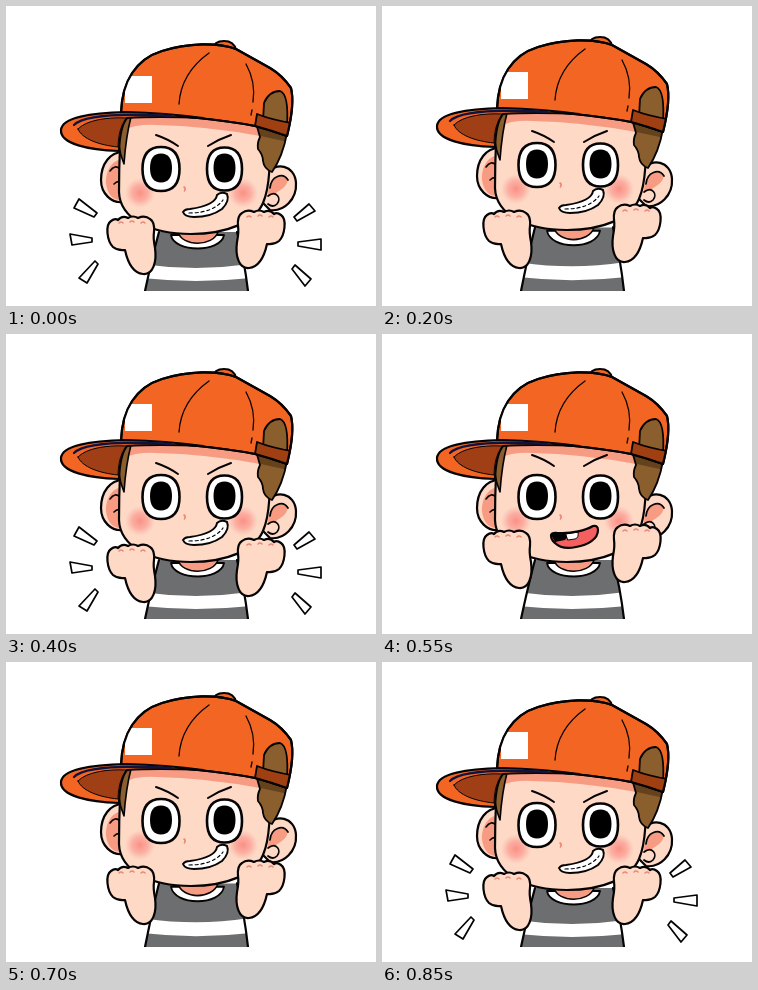
Animation, 370 px wide and 300 px high, one loop 1 s. Source, as an HTML page with a canvas:

```html
<!DOCTYPE html>
<html lang="en">
<head>
<meta charset="utf-8">
<title>Cheering boy</title>
<style>
html, body { margin: 0; width: 100%; height: 100%; overflow: hidden; background: #fff; }
canvas { display: block; width: 370px; height: 300px; }
</style>
</head>
<body>
<canvas id="stage" width="370" height="300"></canvas>
<script>
const ctx = document.getElementById('stage').getContext('2d');
const INK = '#050303', SKIN = '#fdd9c6', BLUSH = '#f79c83', ORANGE = '#f26522', HAIR = '#8b5e2e';
const LOOP = 1000;

// One hop in 50 ms steps: head and hand offsets, mouth, burst marks
const HOP = [
  { head: 0, hand: -14, open: true, burst: false },
  { head: -9, hand: -21, open: true, burst: false },
  { head: -14, hand: -24, open: true, burst: false },
  { head: -4, hand: -6, open: false, burst: false },
  { head: 6, hand: 13, open: false, burst: true },
  { head: 3, hand: 7, open: false, burst: true }
];
const SETTLE = { head: 1, hand: 2, open: false, burst: true };
const REST = { head: 0, hand: 0, open: false, burst: true };

function poseAt(ms) {
  const step = Math.floor(ms / 50);
  if (step >= 1 && step <= 6) return HOP[step - 1];
  if (step === 7) return SETTLE;
  if (step >= 11 && step <= 16) return HOP[step - 11];
  return REST;
}

function shape(d, fill, width = 2.2, stroke = INK) {
  const p = new Path2D(d);
  if (fill) { ctx.fillStyle = fill; ctx.fill(p); }
  if (width) { ctx.strokeStyle = stroke; ctx.lineWidth = width; ctx.stroke(p); }
}

// Ellipse with slightly squared corners
function bead(x, y, rx, ry, fill, width) {
  const a = rx * .66, b = ry * .66;
  shape(`M${x - rx} ${y} C${x - rx} ${y - b} ${x - a} ${y - ry} ${x} ${y - ry}
    S${x + rx} ${y - b} ${x + rx} ${y} S${x + a} ${y + ry} ${x} ${y + ry}
    S${x - rx} ${y + b} ${x - rx} ${y} Z`, fill, width);
}

function eye(x, y, rx, ry) {
  bead(x, y, rx, ry, '#fff', 2.6);
  bead(x, y - 1, 11, 14.5, '#000', 0);
}

function at(dx, dy, draw) {
  ctx.save();
  ctx.translate(dx, dy);
  draw();
  ctx.restore();
}

function clipped(d, draw) {
  ctx.save();
  ctx.clip(new Path2D(d));
  draw();
  ctx.restore();
}

function cheek(x, y) {
  const g = ctx.createRadialGradient(x, y, 1, x, y, 15);
  g.addColorStop(0, 'rgba(250,130,122,.8)');
  g.addColorStop(.5, 'rgba(250,140,132,.55)');
  g.addColorStop(1, 'rgba(250,160,150,0)');
  ctx.fillStyle = g;
  ctx.fillRect(x - 15, y - 15, 30, 30);
}

const SIDES = 'M153 226 Q147 248 139 285 M242 285 Q238 252 231 226';
const TORSO = 'M153 226 Q147 248 139 285 H242 Q238 252 231 226 Z';

function body(lift) {
  ctx.save();
  ctx.beginPath();
  ctx.rect(0, 0, 370, 285);
  ctx.clip();
  ctx.translate(0, 285);
  ctx.scale(1, 1 - lift / 52);
  ctx.translate(0, -285);
  shape(TORSO, '#6d6e70', 0);
  clipped(TORSO, () => shape('M136 258 Q190 266 244 258 V272 Q190 278 136 272 Z', '#fff', 0));
  shape(SIDES, null);
  shape('M165 229 C168 247 215 247 218 229 Z', '#fff', 1.8);
  shape('M172 226 C176 241 207 241 212 226 Z', BLUSH, 1.5);
  ctx.restore();
}

function ears() {
  shape('M117 146 C104 146 95 158 95 174 C95 187 105 198 118 196 Z', SKIN);
  shape('M118 154 C106 152 99 166 100 178 C102 190 108 195 118 194 Z', BLUSH, 0);
  shape('M104 165 Q109 158 114 163 M108 178 Q112 174 115 177', null, 1.6);
  shape('M261 168 C269 155 289 159 290 177 C291 193 278 206 264 204 L256 196 Z', SKIN);
  shape('M262 188 C263 173 273 165 282 173 C281 181 274 184 270 187 L262 191 Z', BLUSH, 0);
  shape('M264 182 C265 170 277 166 282 174 M262 190 C270 184 276 192 271 198 Q267 202 262 198', null, 1.7);
}

const FACE = 'M117 100 C113 140 113 165 113 186 C114 213 145 228 185 228 ' +
  'C221 228 249 216 257 197 C263 183 266 160 262 100 Z';
const SIDE_HAIR = 'M250 117 L281 127 Q277 150 266 166 Q258 163 257 155 Q257 149 252 143 Q251 137 254 131 Z';

function brows() {
  shape('M150 129 Q162 133 172 140 M202 140 Q213 133 225 129', null, 2);
}

function face(open) {
  shape(FACE, SKIN);
  clipped(FACE, () =>
    shape('M112 95 H265 V140 L254 130 Q200 120 150 119 Q130 118 118 124 Z', BLUSH, 0));
  shape('M113 113 L125 111 Q120 130 118 158 Q110 140 113 113 Z', HAIR, 1.6);
  shape(SIDE_HAIR, HAIR, 0);
  clipped(SIDE_HAIR, () => shape('M248 115 L284 125 L282 136 L250 129 Z', '#65411c', 0));
  shape(SIDE_HAIR, null, 1.8);
  cheek(134, 187);
  cheek(237, 187);
  eye(155, 163, 18.5, 22);
  eye(218.5, 163, 17.5, 21.5);
  at(0, open ? -8 : 0, brows);
  shape('M178 181 q2 1 .5 4', null, 1.6, '#ee8577');
  if (open) {
    const mouth = 'M169 201 Q170 198 176 199 C190 200 204 196 211 192 Q216 191 216 196 ' +
      'C216 205 206 211 194 213 Q180 216 173 209 Q169 206 169 201 Z';
    shape(mouth, '#f4605f', 0);
    clipped(mouth, () => shape('M167 197 H190 L183 206 L173 208 Z', INK, 0));
    shape('M184 200 L196 198 Q197 204 193 205 L186 206 Z', '#fff', 1);
    shape(mouth, null);
  } else {
    shape('M177 206 Q179 203 184 203 C198 201 210 197 211 189 Q215 185 221 188 ' +
      'Q224 195 216 203 Q205 211 188 211 Q179 211 177 206 Z', '#fff', 2);
    ctx.setLineDash([3, 3]);
    shape('M183 207 Q207 207 217 194', null, 1.2);
    ctx.setLineDash([]);
  }
}

const CROWN = 'M115 107 C116 75 130 53 156 45 C181 37 212 36 230 43 ' +
  'L264 62 Q276 69 285 82 Q289 98 281 130 Q264 124 249 120 Q197 110 115 107 Z';

function cap() {
  shape('M207 43 Q208 35 218 35 Q228 35 230 44 Z', ORANGE);
  shape(CROWN, ORANGE);
  clipped(CROWN, () => {
    ctx.fillStyle = '#fff';
    ctx.fillRect(119, 70, 27, 27);
    shape('M257 115 L258 97 Q263 85 274 85 Q283 88 281 120 Z', HAIR, 1.8);
    shape('M251 108 Q266 114 286 117 L282 131 Q264 124 249 120 Z', '#a04012', 1.8);
  });
  shape('M203 47 Q175 67 173 98 M240 58 Q250 76 247 96 M246 104 L245 109', null, 1.3);
  shape(CROWN, null);
  shape('M55 124 C56 111 85 107 120 106 Q160 107 197 112 Q151 110 121 112 ' +
    'Q114 120 113 145 C83 144 54 138 55 124 Z', ORANGE);
  shape('M72 123 C80 114 102 111 120 112 Q112 124 112 141 C93 139 76 133 72 123 Z', '#a03e16', 1);
  shape('M68 119 C78 109 113 107 165 110', null, 2.4, '#10133f');
}

function fist() {
  shape('M107 241 C101 235 99 219 105 215 Q109 212 112 214 Q116 209 122 212 Q127 209 132 212 ' +
    'Q139 209 144 213 Q149 216 148 226 Q147 232 149 242 C151 256 147 269 137 268 ' +
    'C128 267 122 258 119 244 Q112 245 107 241 Z', SKIN);
  shape('M113 217 q2 -2 4 0 M124 216 q2 -2 4 0 M135 217 q2 -2 4 0', null, 1.5, '#ea8877');
}

function hands(lift) {
  at(0, lift, fist);
  ctx.save();
  ctx.translate(380, lift - 6);
  ctx.scale(-1, 1);
  fist();
  ctx.restore();
}

function burst() {
  shape('M73 193 L91 207 L88 211 L68 202 Z M64 228 L86 232 V236 L66 239 Z ' +
    'M89 255 L92 258 L81 277 L73 272 Z M303 198 L309 205 L291 215 L288 211 Z ' +
    'M292 236 L315 233 V244 L292 240 Z M289 259 L305 273 L299 280 L286 263 Z', '#fff', 1.7);
}

function draw(now) {
  const pose = poseAt(now % LOOP);
  ctx.fillStyle = '#fff';
  ctx.fillRect(0, 0, 370, 300);
  ctx.lineJoin = ctx.lineCap = 'round';
  body(pose.head);
  at(0, pose.head, () => {
    ears();
    face(pose.open);
    cap();
  });
  hands(pose.hand);
  if (pose.burst) burst();
}

const start = performance.now();
function tick() {
  draw(performance.now() - start);
  requestAnimationFrame(tick);
}
tick();
</script>
</body>
</html>
```
